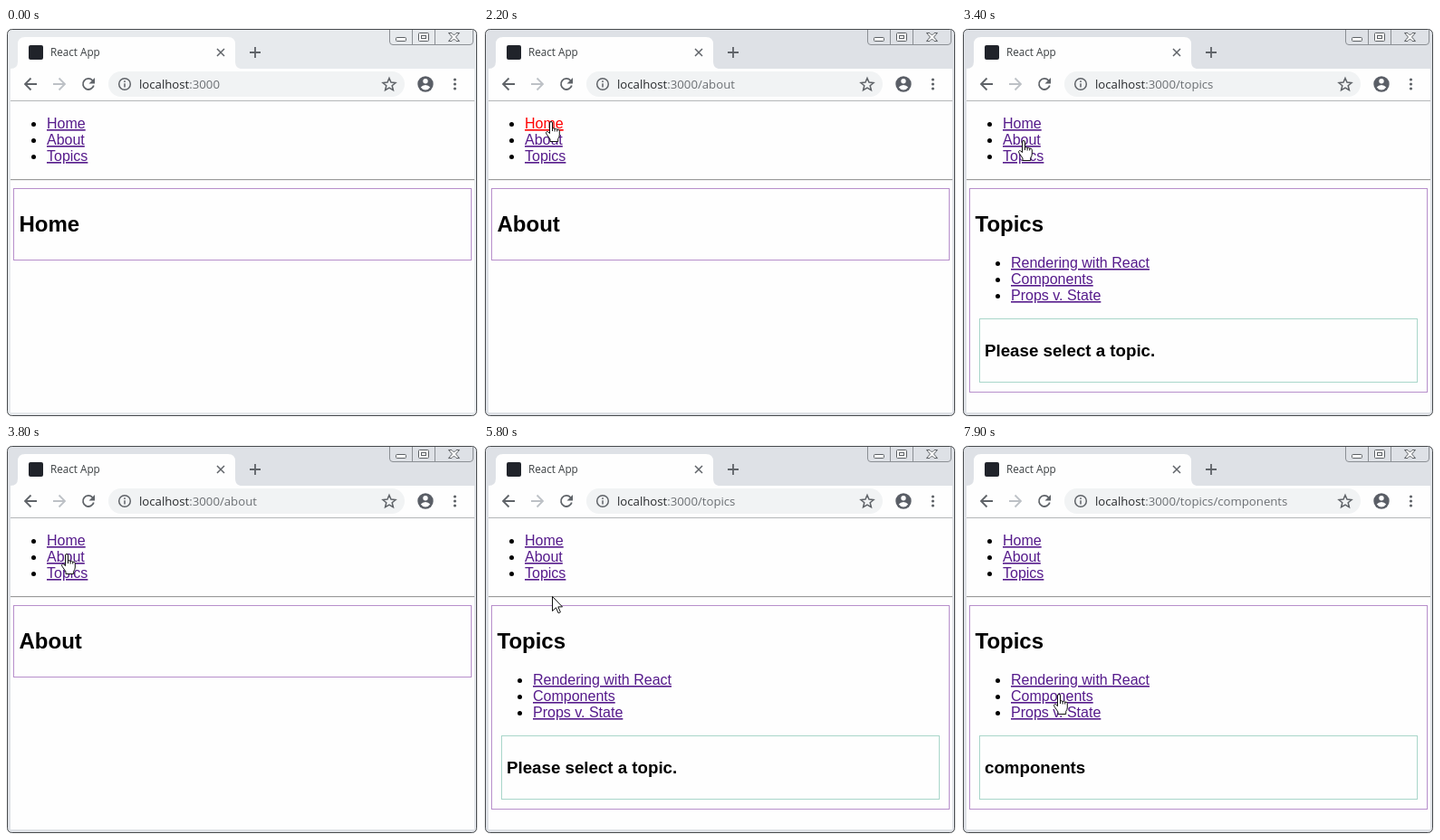
Write an HTML page that moves like this. It is 521 by 430 pixels and loops after 8000 ms.

```html
<!DOCTYPE html>
<html lang="en">
<head>
<meta charset="utf-8">
<title>React App</title>
<style>
  html, body { margin: 0; width: 100%; height: 100%; overflow: hidden; background: #fff; }
  svg { display: block; }
  text { font: 16px "Liberation Sans", Arial, sans-serif; white-space: pre; }
  .ui { font: 11.7px "Open Sans", sans-serif; fill: #3c4043; }
  .url { font-size: 13.2px; fill: #6b6f73; }
  .host { fill: #26282b; }
  .link { fill: #551a8b; text-decoration: underline 1px; text-underline-offset: 1px; }
  .link.pressed { fill: #f00; }
  .h2 { font-size: 24px; font-weight: bold; }
  .h3 { font-size: 18.72px; font-weight: bold; }
  .icon { fill: none; stroke: #5f6368; stroke-width: 1.8; }
  .thin { stroke-width: 1.5; }
  .faded { stroke: #bdc1c6; }
  .caption { fill: #fff; stroke: #5c6064; }
  .crisp { shape-rendering: crispEdges; }
</style>
</head>
<body>
<svg width="521" height="430" viewBox="0 0 521 430">
  <!-- window -->
  <rect id="frame" x="1.5" y="1.5" width="518" height="427" rx="5" stroke="#45484b"/>
  <path class="crisp" fill="#fefefe" d="M5 45H517V425H5Z"/>
  <path fill="#fefefe" d="M5 45q8 0 8-8V18q0-8 8-8H245q8 0 8 8V37q0 8 8 8Z"/>
  <path class="crisp" fill="#b4b6b8" d="M5 80H517V81H5Z"/>
  <g class="caption">
    <path fill="none" stroke="#8b8f94" d="M423.5 2V15q0 3.5 3.5 3.5H512q3.5 0 3.5-3.5V2M448.5 2V18M473.5 2V18"/>
    <rect x="430.5" y="10.5" width="11" height="4" rx="1"/>
    <rect x="455.5" y="5.5" width="11" height="9" rx="1"/>
    <rect x="458.5" y="8.5" width="5" height="3"/>
    <path d="M488.5 5.5h3.5l2.5 2.5 2.5-2.5h3.5l-4 4.500 4 4.500h-3.500l-2.500-2.500-2.500 2.500h-3.500l4-4.500Z"/>
  </g>

  <!-- tab and toolbar -->
  <rect x="25" y="19" width="16" height="16" rx="2" fill="#20232a"/>
  <text class="ui" x="49" y="31">React App</text>
  <path class="icon thin" d="M233 23l8 8m0-8l-8 8"/>
  <path class="icon" d="M269 27h12m-6-6v12"/>
  <path class="icon" d="M34 62H21m6.500-6.500L21 62l6.500 6.500"/>
  <path class="icon faded" d="M52 62h13m-6.500-6.500L65 62l-6.500 6.500"/>
  <path class="icon" d="M95.500 58a6 6 0 1 0 1.300 5.500"/>
  <path fill="#5f6368" d="M98 55v6.500h-6.500Z"/>
  <rect x="113" y="48" width="327" height="28" rx="14" fill="#f1f3f4"/>
  <circle class="icon thin" cx="131" cy="62" r="6.300"/>
  <path class="icon thin" d="M131 58.300v1.700m0 1.200v4.300"/>
  <text class="ui url" x="147" y="67"><tspan class="host">localhost</tspan>:3000<tspan id="path"></tspan></text>
  <path class="icon thin" d="M423 55.500l2 4.600 5 .4-3.800 3.300 1.200 4.900-4.400-2.600-4.400 2.600 1.200-4.900-3.800-3.300 5-.4Z"/>
  <circle cx="463" cy="62" r="8.700" fill="#5a5e66"/>
  <path fill="#fff" d="M463 56a2.700 2.700 0 0 1 0 5.400a2.700 2.700 0 0 1 0-5.400M457.800 65.500q2-2.500 5.200-2.500t5.200 2.500q-2 3-5.200 3t-5.200-3"/>
  <path stroke="#5f6368" stroke-width="3.200" stroke-linecap="round" stroke-dasharray="0 5" d="M495.500 57v10.100"/>

  <!-- page -->
  <g id="nav"></g>
  <path class="crisp" fill="#9a9a9a" d="M5 167H517V168H5Z"/>
  <path class="crisp" fill="#eee" d="M5 168H517V169H5Z"/>
  <rect id="box" x="8.500" y="177.500" width="505" fill="none" stroke="#b78fcb"/>
  <text id="heading" class="h2" x="14.500" y="225"></text>
  <g id="topics">
    <g id="subnav"></g>
    <rect x="19.500" y="321.500" width="483" height="70" fill="none" stroke="#a9d6ca"/>
    <text id="topic" class="h3" x="25" y="362.500"></text>
  </g>

  <g id="cursor" fill="#fff" stroke="#111" stroke-linejoin="round">
    <path id="arrow" d="M.5.500V16.500l4-3.700 2.600 6 2.300-1-2.600-5.900H11.500Z"/>
    <path id="hand" d="M-1.500 2a1.500 1.500 0 0 1 3 0V8q1.300-.9 2.600.5q1.400-.8 2.600.6q2.300-.4 2.600 1.600V15q0 2.500-1.600 4.500V22.500H-1V20L-5 14.200q-1.300-2 .3-2.600q1.300-.4 3.200 2ZM1.500 8v3M4.100 8.500v3M6.700 9v2.500"/>
  </g>
</svg>
<script>
const LOOP = 8000, STEP = 100, ROW = 18;
const $ = id => document.getElementById(id);

const links = {};
function addList(parent, x, top, items) {
  items.forEach(([label, path], i) => {
    const base = top + ROW * i;
    parent.insertAdjacentHTML('beforeend',
      `<circle cx="${x - 14.5}" cy="${base - 4.5}" r="2.5"/><text class="link" x="${x}" y="${base}">${label}</text>`);
    links[path] = { text: parent.lastElementChild, y: base - 8 };
  });
}
addList($('nav'), 45, 111, [['Home', ''], ['About', '/about'], ['Topics', '/topics']]);
addList($('subnav'), 54, 265, [
  ['Rendering with React', '/topics/rendering'],
  ['Components', '/topics/components'],
  ['Props v. State', '/topics/props-v-state'],
]);

// The pointer rests on a link, holds the button down, then the page changes.
// Travel time grows with the logarithm of the distance (Fitts's law).
let from = { x: 580, y: 16 };
const clicks = [
  { path: '/about', x: 78, press: 1400 },
  { path: '', x: 74, press: 2200, hold: 200 },
  { path: '/topics', x: 73, press: 3000 },
  { path: '/about', x: 67, press: 3700 },
  { path: '', x: 70, press: 4300 },
  { path: '/topics', x: 70, press: 5300 },
  { path: '/topics/rendering', x: 92, press: 6600, rest: 400 },
  { path: '/topics/components', x: 107, press: 7800 },
].map(({ path, x, press, hold = 100, rest = 200 }) => {
  const y = links[path].y, arrive = press - rest;
  const travel = 85 * Math.log2(Math.hypot(x - from.x, y - from.y));
  const click = { path, x, y, from, press, arrive, travel, shown: press + hold };
  from = click;
  return click;
});

function pointerAt(t) {
  const click = clicks.findLast(c => t >= c.arrive - c.travel) || clicks[0];
  const { from, x, y, arrive, travel } = click;
  const k = Math.min(1, Math.max(0, 1 - (arrive - t) / travel));
  // It sweeps in on a curve, then eases from link to link.
  const entering = click === clicks[0];
  const left = entering ? (1 - k) ** 2 : 1 - k * k * (3 - 2 * k);
  const leftY = entering ? left ** 2 : left;
  return [Math.round(x + (from.x - x) * left), Math.round(y + (from.y - y) * leftY)];
}

const show = (el, on) => el.style.display = on ? '' : 'none';

function draw(t) {
  const path = clicks.findLast(c => c.shown <= t)?.path ?? '';
  const pressed = clicks.find(c => c.press <= t && t < c.shown)?.path;
  const [, section, topic] = path.split('/');
  const inTopics = section === 'topics';

  $('frame').setAttribute('fill', t < clicks[0].press ? '#e7eaed' : '#dee1e6');
  $('path').textContent = path;
  $('heading').textContent = { about: 'About', topics: 'Topics' }[section] || 'Home';
  $('topic').textContent = topic || 'Please select a topic.';
  $('box').setAttribute('height', inTopics ? 225 : 79);
  show($('topics'), inTopics);
  for (const key in links) links[key].text.classList.toggle('pressed', key === pressed);

  const [x, y] = pointerAt(t);
  const overLink = x < 91 && y > 95 && y < 152 || y > 250;
  $('cursor').setAttribute('transform', `translate(${x} ${y})`);
  show($('hand'), overLink);
  show($('arrow'), !overLink);
}

function tick() {
  draw(Math.floor(performance.now() % LOOP / STEP) * STEP);
  requestAnimationFrame(tick);
}
tick();
</script>
</body>
</html>
```
